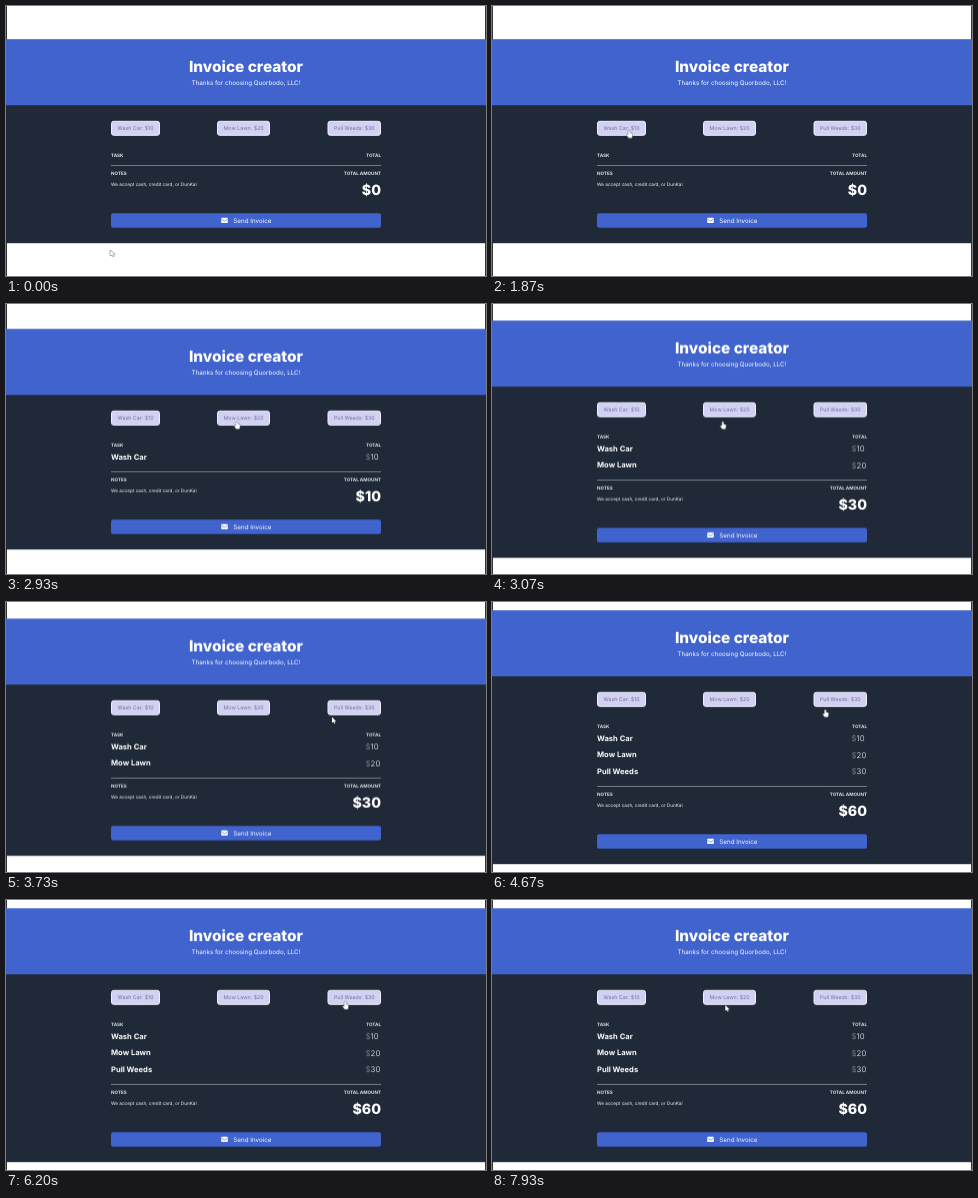
Write an HTML page that moves like this. It is 480 px wide and 270 px high and loops after 8000 ms.

```html
<!DOCTYPE html>
<html lang="en">
<head>
<meta charset="utf-8">
<title>Invoice creator</title>
<style>
html, body { margin: 0; width: 100%; height: 100%; overflow: hidden; background: #fff; }
svg {
  display: block; width: 480px; height: 270px; fill: #fff;
  font-family: Inter, sans-serif; text-rendering: geometricPrecision;
}
svg * { animation-duration: 8s; animation-iteration-count: infinite; animation-timing-function: step-end; }
.h1 { font-size: 15.4px; font-weight: 800; }
.sub { font-size: 6.25px; }
.mid { text-anchor: middle; }
.end { text-anchor: end; }
.job rect { fill: #d3d1f1; stroke: #efeefb; }
.job text { font-size: 5.3px; fill: #7370a2; text-anchor: middle; }
.label { font-size: 4.6px; font-weight: 700; fill: #dfe3e9; }
.note { font-size: 4.65px; fill: #f4f5f7; }
.task { font-size: 7.6px; font-weight: 700; }
.price { font-size: 7.9px; font-weight: 300; }
.price tspan { fill: #8b929c; }
.sum { font-size: 14.2px; font-weight: 800; text-anchor: end; }

/* page is centred, so each new line pushes the top up and the bottom down */
.top { animation-name: top; }
.bottom { animation-name: bottom; }
@keyframes top {
  0% { transform: translateY(0); }
  25% { transform: translateY(-8.3px); }
  38.375% { transform: translateY(-16.6px); }
  53.375%, 100% { transform: translateY(-24.9px); }
}
@keyframes bottom {
  0% { transform: translateY(0); }
  25% { transform: translateY(8.3px); }
  38.375% { transform: translateY(16.6px); }
  53.375%, 100% { transform: translateY(24.9px); }
}
.in1 { animation-name: in1; }
.in2 { animation-name: in2; }
.in3 { animation-name: in3; }
.out1 { animation-name: out1; }
.out2 { animation-name: out2; }
.out3 { animation-name: out3; }
@keyframes in1 { 0% { opacity: 0; } 25%, 100% { opacity: 1; } }
@keyframes in2 { 0% { opacity: 0; } 38.375%, 100% { opacity: 1; } }
@keyframes in3 { 0% { opacity: 0; } 53.375%, 100% { opacity: 1; } }
@keyframes out1 { 0% { opacity: 1; } 25%, 100% { opacity: 0; } }
@keyframes out2 { 0% { opacity: 1; } 38.375%, 100% { opacity: 0; } }
@keyframes out3 { 0% { opacity: 1; } 53.375%, 100% { opacity: 0; } }

.cursor { animation-name: move; animation-timing-function: ease-in-out; }
.cursor path { stroke: #25272c; stroke-width: .7; stroke-linejoin: round; paint-order: stroke; }
.arrow { animation-name: arrow; }
.hand { animation-name: hand; }
@keyframes move {
  0%, .8% { transform: translate(104.5px, 244px); }
  3.4%, 8% { transform: translate(104.5px, 246px); }
  15.9%, 25.5% { transform: translate(137.2px, 124.5px); }
  36.6%, 38.8% { transform: translate(230.7px, 117.5px); }
  46.6%, 49% { transform: translate(326px, 115px); }
  51.6%, 53.3% { transform: translate(328.5px, 111px); }
  58.5%, 67.5% { transform: translate(333.3px, 107.5px); }
  77.5%, 94.5% { transform: translate(339.2px, 101.8px); }
  99.1%, 100% { transform: translate(233.3px, 105px); }
}
@keyframes arrow {
  0% { opacity: 1; }
  14.6% { opacity: 0; }
  26.6% { opacity: 1; }
  34.1% { opacity: 0; }
  40% { opacity: 1; }
  50% { opacity: 0; }
  95.8%, 100% { opacity: 1; }
}
@keyframes hand {
  0% { opacity: 0; }
  14.6% { opacity: 1; }
  26.6% { opacity: 0; }
  34.1% { opacity: 1; }
  40% { opacity: 0; }
  50% { opacity: 1; }
  95.8%, 100% { opacity: 0; }
}
</style>
</head>
<body>
<svg viewBox="0 0 480 270">
  <path d="M0 0H1V270H0ZM479 0H480V270H479Z" fill="#000" opacity=".8"/>
  <rect class="bottom" y="99" width="480" height="138.2" fill="#1f2937"/>

  <g class="top">
    <rect y="98" width="480" height="80" fill="#1f2937"/>
    <rect y="33.2" width="480" height="66" fill="#4063cd"/>
    <text class="h1 mid" x="240" y="66">Invoice creator</text>
    <text class="sub mid" x="240" y="79.4">Thanks for choosing Quorbodo, LLC!</text>

    <g class="job">
      <rect x="105.5" y="115.3" width="48" height="14" rx="2.2"/>
      <text x="129.5" y="124.2">Wash Car: $10</text>
      <rect x="211.5" y="115.3" width="52" height="14" rx="2.2"/>
      <text x="237.6" y="124.2">Mow Lawn: $20</text>
      <rect x="322" y="115.3" width="52.5" height="14" rx="2.2"/>
      <text x="348.3" y="124.2">Pull Weeds: $30</text>
    </g>

    <text class="label" x="105" y="150.8">TASK</text>
    <text class="label end" x="375" y="150.8">TOTAL</text>
    <g class="in1">
      <text class="task" x="105" y="163.8">Wash Car</text>
      <text class="price" x="359.6" y="163.9"><tspan>$</tspan>10</text>
    </g>
    <g class="in2">
      <text class="task" x="105" y="180.4">Mow Lawn</text>
      <text class="price" x="359.6" y="180.5"><tspan>$</tspan>20</text>
    </g>
    <g class="in3">
      <text class="task" x="105" y="197">Pull Weeds</text>
      <text class="price" x="359.6" y="197.1"><tspan>$</tspan>30</text>
    </g>
  </g>

  <g class="bottom">
    <rect x="105" y="159.4" width="270" height=".6" fill="#a9afb8"/>
    <text class="label" x="105" y="169.2">NOTES</text>
    <text class="label end" x="375" y="169.2">TOTAL AMOUNT</text>
    <text class="note" x="105" y="180.1">We accept cash, credit card, or DunKal</text>
    <text class="sum out1" x="375" y="188.7">$0</text>
    <g class="in1"><text class="sum out2" x="375" y="188.7">$10</text></g>
    <g class="in2"><text class="sum out3" x="375" y="188.7">$30</text></g>
    <text class="sum in3" x="375" y="188.7">$60</text>

    <rect x="105" y="207.2" width="270" height="14.5" rx="2" fill="#4063cd"/>
    <rect x="215.2" y="211.8" width="6.6" height="5.2" rx=".8"/>
    <path d="M215.2 213L218.5 215.2 221.8 213" fill="none" stroke="#4063cd" stroke-width=".6"/>
    <text class="sub" x="227.3" y="216.7">Send Invoice</text>
  </g>

  <g class="cursor">
    <path class="arrow" d="M0 0V6L1.4 4.7 2.4 6.8 3.3 6.4 2.4 4.4H4.2Z"/>
    <path class="hand" d="M-.8 .4Q0 -.6 .8 .4V2.6L2.8 3.2Q3.5 3.5 3.3 4.6L2.7 7.4H-.6L-2.5 4.8Q-2.5 3.6 -.8 4.4Z"/>
  </g>
</svg>
</body>
</html>
```
